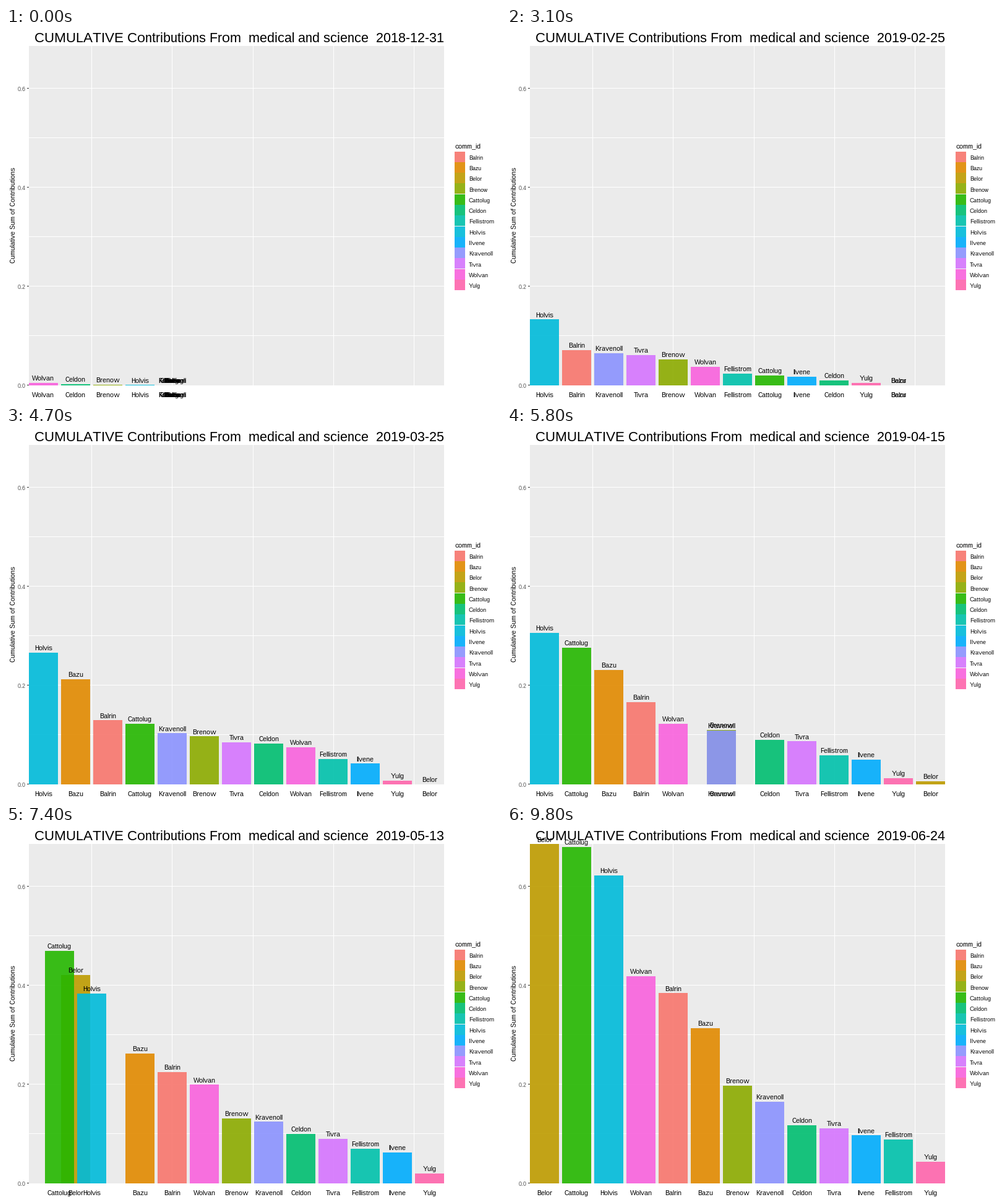
A matplotlib script for the animation above (10 s loop, 800 by 600 pixels).

```python
import matplotlib.pyplot as plt
import numpy as np
from matplotlib.animation import FuncAnimation
from matplotlib.patches import Rectangle

# Whole-pixel glyph advances without kerning
plt.rcParams.update({
    "font.family": "Liberation Sans",
    "text.hinting": "native",
    "text.hinting_factor": 1,
    "text.kerning_factor": 6,
})

FRAMES, INTERVAL = 100, 100
LEFT, RIGHT, TOP, BASE = 37, 708, 29, 578
STEP = (RIGHT - LEFT) / 12.9
SCALE = 0.801  # pixels per thousandth
KEY = 17.28
ALPHA = 0.9
LAST = 25

# (week, cumulative sum in thousandths) where each straight run bends
BENDS = {
    "Balrin": [(7, 0), (8, 71), (21, 261), (25, 384)],
    "Bazu": [(10, 0), (12, 212), (25, 313)],
    "Belor": [(14, 0), (16, 25), (19, 500), (21, 595), (25, 685)],
    "Brenow": [(0, 1), (8, 53), (12, 97), (21, 145), (25, 197)],
    "Cattolug": [(0, 0), (8, 20), (12, 122), (17, 431), (21, 534), (25, 679)],
    "Celdon": [(0, 2.5), (8, 10), (12, 83), (25, 117)],
    "Fellistrom": [(0, 0), (8, 24), (12, 51), (25, 89)],
    "Holvis": [(0, 0.8), (3, 20), (4, 85), (8, 133), (12, 266), (17, 346),
               (21, 447), (25, 622)],
    "Ilvene": [(5, 0), (12, 42), (21, 71), (25, 97)],
    "Kravenoll": [(5, 0), (8, 65), (12, 103), (17, 115), (25, 165)],
    "Tivra": [(0, 0), (4, 37), (12, 85), (21, 92), (25, 111)],
    "Wolvan": [(0, 5), (8, 38), (12, 75), (21, 247), (25, 418)],
    "Yulg": [(0, 0), (12, 7.5), (21, 25), (25, 44)],
}
NAMES = list(BENDS)


def hue_color(degrees, chroma=100, light=65):
    """Evenly bright colour: polar CIE-LUV to sRGB."""
    h = np.radians(degrees)
    u = chroma * np.cos(h) / (13 * light) + 0.19784
    v = chroma * np.sin(h) / (13 * light) + 0.46834
    y = ((light + 16) / 116) ** 3
    x = 9 * y * u / (4 * v)
    z = 3 * y / v - x / 3 - 5 * y
    rgb = np.array([3.2405 * x - 1.5372 * y - 0.4985 * z,
                    -0.9693 * x + 1.8760 * y + 0.0416 * z,
                    0.0556 * x - 0.2040 * y + 1.0573 * z])
    rgb = np.clip(rgb, 0, 1)
    return tuple(np.where(rgb > 0.00304, 1.055 * rgb ** (1 / 2.4) - 0.055,
                          12.92 * rgb))


COLORS = [hue_color(15 + 360 * i / len(NAMES)) for i in range(len(NAMES))]

weeks = np.arange(LAST + 1)
values = np.array([np.interp(weeks, *zip(*BENDS[n])) for n in NAMES]).T
# Tied entries share the best rank
ranks = (values[:, None, :] > values[:, :, None] + 1e-9).sum(axis=2)

# Each move runs from one frame to another, with rests between
MOVES = [(1, 4), (5, 8), (8, 11), (13, 16), (17, 20), (20, 24), (24, 27)]
MOVES += [(f, f + 2) for f in range(29, 97, 4)] + [(96, 98)]
TIMES = np.ravel(MOVES)
STATES = np.repeat(weeks, 2)[1:-1]

fig = plt.figure(figsize=(8, 6), dpi=100, facecolor="white")
ax = fig.add_axes([0, 0, 1, 1])
ax.set(xlim=(0, 800), ylim=(600, 0))
ax.set_axis_off()


def box(x, y, w, h, color, z=1, alpha=None):
    patch = Rectangle((x, y), w, h, facecolor=color, edgecolor="none", lw=0,
                      alpha=alpha, antialiased=False, snap=True, zorder=z)
    return ax.add_patch(patch)


def label(x, y, text, px=11, ha="center", color="black", **kw):
    return ax.text(x, y, text, fontsize=px * 0.72, ha=ha, color=color,
                   va=kw.pop("va", "baseline"), zorder=5, **kw)


# Panel, grid and axis
box(LEFT, TOP, RIGHT - LEFT, BASE - TOP, "#EBEBEB")
for i in range(6):
    box(LEFT, 97 + 80 * i, RIGHT - LEFT, 1, "white")
for i in range(1, 6):
    x = LEFT + STEP * (2.5 * i - 0.55)
    box(round(x), TOP, 1, BASE - TOP, "white")
for i in range(4):
    y = BASE - 1 - 160 * i
    box(34, y, 3, 1, "#333333")
    label(32, y + 4.5, f"{0.2 * i:.1f}", 9, "right", "#4D4D4D")
label(12, 303, "Cumulative Sum of Contributions", rotation=90, va="center")
title = label(RIGHT, 23, "", 22, "right")

# Legend
label(725, 194, "comm_id", ha="left")
for i, (name, color) in enumerate(zip(NAMES, COLORS)):
    y = 200 + KEY * i
    top, bottom = int(y), int(y + KEY)
    box(725, top, 17, bottom - top, "#F2F2F2")
    box(725, top, 17, bottom - top, color, 2, ALPHA)
    label(748, y + 12.8, name, 9, "left")
for i in (4, 7, 11):
    box(725, round(200 + KEY * i) - 1, 17, 1, "#F2F2F2", 3)

bars = [box(0, BASE, 1, 0, color, 2, ALPHA) for color in COLORS]
tags = [label(0, 0, name) for name in NAMES]
ticks = [label(0, 597, name) for name in NAMES]


def draw(frame):
    pos = np.interp(frame, TIMES, STATES)
    a = int(pos + 1e-9)
    b, u = min(a + 1, LAST), pos - a
    height = (values[a] * (1 - u) + values[b] * u) * SCALE
    rank = ranks[a] * (1 - u) + ranks[b] * u
    for bar, tag, tick, h, r in zip(bars, tags, ticks, height, rank):
        x = LEFT + STEP * r
        bar.set_bounds(round(x), BASE - round(h), 47, round(h))
        mid = x + STEP * 0.45
        tag.set_position((mid, BASE - h - 3.8))
        tick.set_x(mid)
    day = np.datetime64("2018-12-31") + 7 * int(pos + 0.5 + 1e-9)
    title.set_text("CUMULATIVE Contributions From  medical and science  "
                   f"{day}")
    return [title, *bars, *tags, *ticks]


anim = FuncAnimation(fig, draw, frames=FRAMES, interval=INTERVAL,
                     repeat=True, repeat_delay=0)
plt.show()
```
